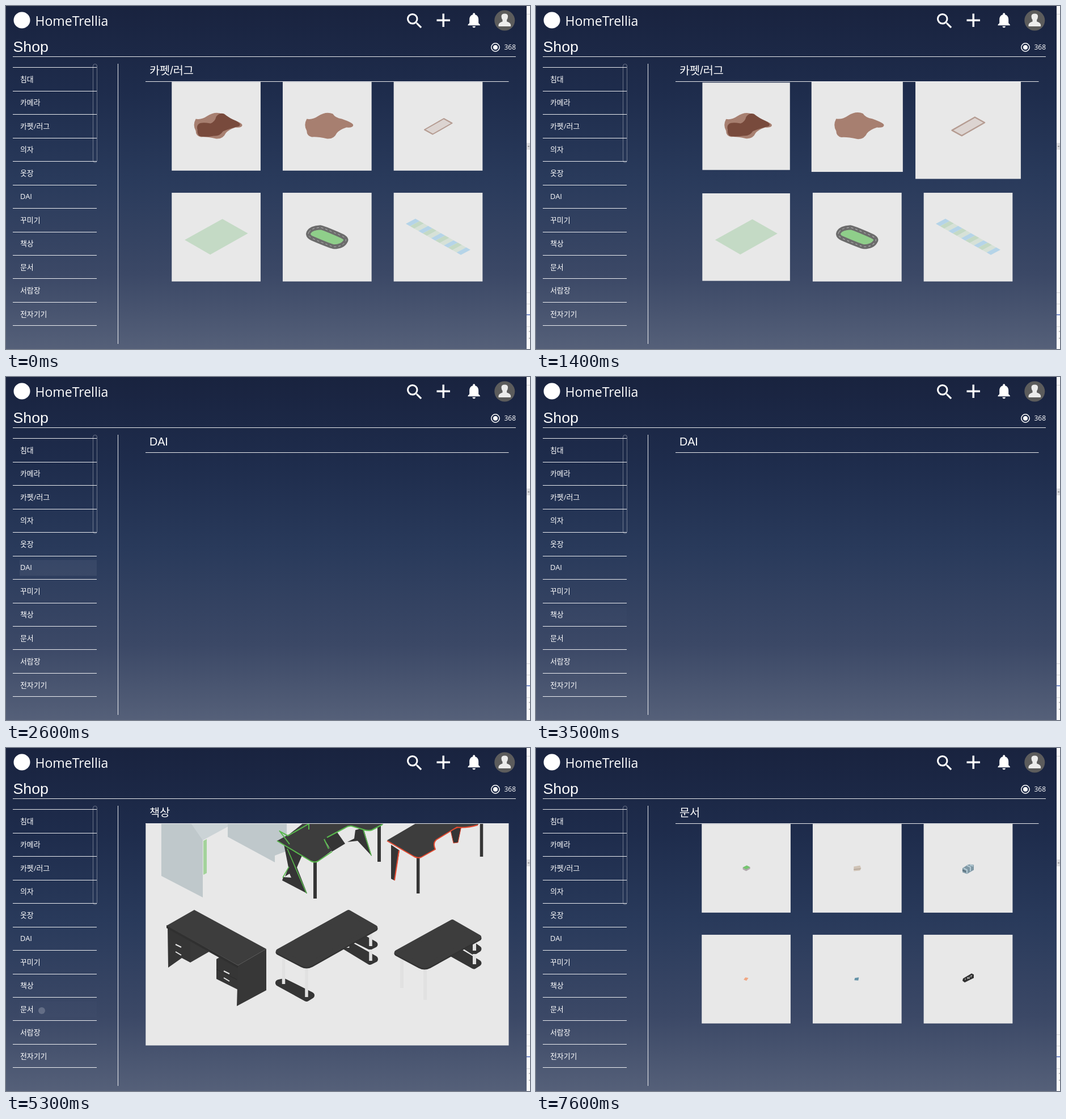
Animation, 924 px wide and 606 px high, one loop 7.7 s. Source, as an HTML page:

```html
<!DOCTYPE html>
<html lang="ko">
<head>
<meta charset="utf-8">
<title>Shop</title>
<style>
  html, body { margin: 0; width: 100%; height: 100%; overflow: hidden; background: #19233f; }
  svg { display: block; width: 924px; height: 606px; }
  text { fill: #fff; font-family: "Open Sans", "Noto Sans CJK KR", "Noto Sans CJK", sans-serif; }
  .head { font-family: "Liberation Sans", "Noto Sans CJK KR", "Noto Sans CJK", sans-serif; }
</style>
</head>
<body>
<svg id="stage" viewBox="0 0 924 606" xmlns="http://www.w3.org/2000/svg">
  <defs>
    <linearGradient id="night" x2="0" y2="1">
      <stop offset="0" stop-color="#19233f"/>
      <stop offset=".25" stop-color="#1e2c4c"/>
      <stop offset=".5" stop-color="#293a5b"/>
      <stop offset=".78" stop-color="#3b4866"/>
      <stop offset="1" stop-color="#556079"/>
    </linearGradient>
    <clipPath id="shelf"><rect x="246.300" y="134" width="640.200" height="391.400"/></clipPath>
    <clipPath id="rowClip"><rect id="rowClipBox" x="24" width="136" height="28"/></clipPath>
  </defs>
  <rect width="924" height="606" fill="url(#night)"/>
  <g id="strip">
    <rect x="918" width="6" height="606" fill="#fafafa"/>
    <path d="M918 14.500h6M918 506.500h6M918 526.500h6M918 566.500h6" stroke="#d5d5d8"/>
    <path d="M918 545.500h6" stroke="#4a64b8" stroke-width="1.500"/>
    <path d="M922 575h2M922 587h2" stroke="#888"/>
    <g id="thumb"><rect x="918" y="-6" width="6" height="12" fill="#dcdcdf"/><path d="M920 0h3" stroke="#666"/></g>
  </g>
  <circle cx="28" cy="25" r="14.500" fill="#fff"/>
  <text x="51.500" y="35" font-size="23">HomeTrellia</text>
  <g fill="#fff">
    <path transform="translate(702.500 8.500) scale(1.500)" d="M15.500 14h-.790l-.280-.270A6.470 6.470 0 0 0 16 9.500 6.500 6.500 0 1 0 9.500 16c1.610 0 3.090-.590 4.230-1.570l.270.280v.790l5 4.990L20.490 19zM9.500 14a4.500 4.500 0 1 1 0-9 4.500 4.500 0 0 1 0 9z"/>
    <path d="M759.500 23.500h10v-10h3.500v10h10v3.500h-10v10h-3.500v-10h-10z"/>
    <path transform="translate(809.200 9) scale(1.333)" d="M12 22c1.100 0 2-.900 2-2h-4c0 1.100.900 2 2 2zm6-6v-5c0-3.070-1.640-5.640-4.500-6.320V4c0-.830-.670-1.500-1.500-1.500s-1.500.670-1.500 1.500v.680C7.630 5.360 6 7.920 6 11v5l-2 2v1h16v-1z"/>
  </g>
  <circle cx="879.300" cy="25.500" r="18" fill="#5c5c5c"/>
  <path d="M868.500 36v-3q1-4 7-5.500v-3q-2-3-2-6 0-5 5.800-5t5.800 5q0 3-2 6v3q6 1.500 7 5.500v3z" fill="#ececec"/>
  <text class="head" x="12.500" y="81" font-size="26.700">Shop</text>
  <circle cx="863" cy="73" r="7.200" fill="none" stroke="#fff" stroke-width="1.500"/>
  <circle cx="863" cy="73" r="4" fill="#fff"/>
  <text x="878.500" y="77.300" font-size="12">368</text>
  <rect id="hover" x="24" width="136" height="28" fill="#fff"/>
  <g clip-path="url(#rowClip)"><circle id="ripple" cx="63" fill="#fff"/></g>
  <g id="menu"></g>
  <g fill="none" stroke="#fff">
    <path stroke-opacity=".9" d="M12 89.500H899M246 133.500H886.500M197.500 102V597"/>
    <rect x="153.500" y="102.500" width="7" height="174" rx="3.500" stroke-opacity=".35"/>
  </g>
  <text id="title" class="head" x="253" y="121" font-size="19.700"></text>
  <g id="pages" clip-path="url(#shelf)"></g>
</svg>
<script>
const LOOP = 7700, STEP = 100, SIZE = 156.7;
const LIGHT = "#e8e8e8", SHADE = "#dedede", DARK = "#3d3d3d", SIDE = "#353535";
const byId = id => document.getElementById(id);

function add(parent, tag, attrs) {
  const node = document.createElementNS("http://www.w3.org/2000/svg", tag);
  for (const key in attrs) node.setAttribute(key, attrs[key]);
  return parent.appendChild(node);
}
const shape = (d, fill, stroke = "none", width = 1, extra = "") =>
  `<path d="${d}" fill="${fill}" stroke="${stroke}" stroke-width="${width}" stroke-linejoin="round" ${extra}/>`;
const line = (d, stroke, width, cap = "butt") =>
  shape(d, "none", stroke, width, `stroke-linecap="${cap}"`);

// Sidebar
const items = ["침대", "카메라", "카펫/러그", "의자", "옷장", "DAI", "꾸미기", "책상", "문서", "서랍장", "전자기기"];
const rowY = i => 129.5 + i * 41.45;
const menu = byId("menu");
for (let i = 0; i <= items.length; i++) {
  const y = Math.floor(rowY(i) - 20.6) + .5;
  add(menu, "path", { d: `M12 ${y}H160`, stroke: "#fff", "stroke-opacity": .9 });
  if (i < items.length)
    add(menu, "text", { x: 25, y: rowY(i) + 4.5, "font-size": 12.9 }).textContent = items[i];
}

// Item drawings: rugs and papers are centred on 0,0; desks use stage coordinates
const hide = shape("M-36-13Q-26-11-16-18Q-2-27 10-22Q14-15 26-13Q46-6 46-2Q46 3 34 2Q22 6 17 12Q12 23 0 22Q-18 18-27 19Q-36 17-36 8Q-42-2-36-13Z", "#a77f70");
function stripes() {
  const colors = ["#b5d4e8", "#c4d9c5", "#d6e1d7"], n = 13;
  let out = "";
  for (let i = 0; i < n; i++) {
    const x = -57 + 97 * i / n, y = -23.5 + 55 * i / n;
    out += shape(`M${x} ${y}l17-9l${97 / n} ${55 / n}l-17 9z`, colors[i % 3]);
  }
  return out;
}
const track = "M-32-9Q-28-16-12-17Q-8-17 26-2Q36 3 32 8Q27 17 12 17Q8 17-27 2Q-36-3-32-9Z";
const rugs = [
  hide + shape("M-31-4Q-26-8-10-5Q-2-8 0-17Q6-25 14-22Q24-14 34-10Q46-4 40 0Q20 5 12 9Q6 18-4 17Q-22 20-30 17Q-34 12-33 6Q-35 0-31-4Z", "#784a3c"),
  hide,
  shape("M-24 6L10-13.500L24.500-5.500L-9.500 14Z", "#dcd4d1", "#b59c92", 2),
  shape("M-55.500 5L11-32L56-6.500L-10.500 31Z", "#c4dac5"),
  shape(track, "#8fce8a", "#6c6c6c", 8) + shape(track, "none", "#b5b5b5", 1, 'stroke-dasharray="4 4"'),
  stripes()
];

const green = "#58b94c", red = "#e5492f", steel = "#bfc8cb", pale = "#e1e1e1";
const foot = (d, width) => shape(d, SIDE, SIDE, width);
const desks = [
  shape("M274 110H330L347 163V264L274 226Z", steel) + shape("M310 110L347 163L393 138V110Z", "#cbd3d6") +
    shape("M391 110V157L474 202V190L495 182V110Z", steel) + shape("M348 164L354 161V221L348 224Z", "#a3d39b"),
  shape("M490 170L522 190L513 211L531 257L487 234L489 228L503 229L500 222L492 227L498 211Z", SIDE) +
    line("M496 178L530 257M488 229L499 210", green, 1.6) +
    shape("M561 161L582 146L598 169L575 183Z", SIDE) +
    shape("M602 166L614 160L616 145L630 141L645 191L620 164Z", SIDE) + line("M630 145L644 190", green, 1.6) +
    line("M545 201V266M658 136V201", SIDE, 6) +
    shape("M478 164L500 152L534 125H680L664 135L645 145Q638 147 630 144L610 138Q604 137 598 141L566 158Q558 164 575 181L550 200Q544 203 538 200Z", DARK) +
    line("M478 164L538 200Q544 203 550 200L575 183M561 161L569 178M566 158L598 141Q604 137 610 138L630 144Q638 147 645 145L664 135", green, 2) +
    line("M500 170L482 146M484 148L497 155L534 134V144", green, 2),
  shape("M679 171L694 181L685 234L679 231Z", SIDE) + line("M693 181L685 234", red, 2) +
    shape("M784 146L803 138L797 167L789 168Z", SIDE, red, 1) + line("M726.700 192V257M838.500 130V192", SIDE, 5.500) +
    shape("M672 163L735 126H840L832 136Q812 142 795 140L759 162Q752 168 757 179L732 193Q726 195 720 192Z", DARK) +
    line("M672 164L720 192Q726 195 732 193L757 179Q752 168 759 162L795 140Q812 142 832 136", red, 2),
  shape("M285 317L325 340V379L310 371L286 388Z", SIDE) + shape("M325 338L358 360L325 379Z", "#393939") +
    shape("M371 373L378 369L409 387V427L371 408Z", "#363636") + shape("M283 313L409 384V389L283 318Z", "#303030") +
    shape("M409 384L459 355V428L407 456Z", "#373737") + shape("M283 314L332 286L459 355L409 384Z", DARK) +
    line("M299 347L309 352M299 360L309 366M384 394L394 399M384 406L394 412", "#e5e5e5", 2) + line("M371 391L407 409", "#2c2c2c", 1),
  foot("M481 415L490 413L538 437L530 442Z", 12) + foot("M596 349L604 347L650 373L642 377Z", 12) +
    foot("M606 333L618 329L650 347L642 351Z", 11) +
    line("M489.500 372V417M530 388V440M602.500 340V353M643 320V350M643 356V376", pale, 5.500) +
    shape("M480 361L604 291L651 319L538 383Q530 387 522 383Z", "#323232", "#323232", 9) +
    shape("M480 359L604 290L651 317L538 381Q530 385 522 381Z", DARK, DARK, 8),
  foot("M784 362L796 358L833 380L825 385Z", 11) + foot("M800 344L812 340L833 355L825 360Z", 11) +
    line("M698 370V424M739 388V445M826 340V358M826 364V382", pale, 6) +
    shape("M689 363L787 308L834 336L746 385Q738 389 730 385Z", "#323232", "#323232", 9) +
    shape("M689 361L787 307L834 334L746 383Q738 387 730 383Z", DARK, DARK, 8)
];

const papers = [
  shape("M-6-1.500L1-5L7-2V1L0 5L-6 2Z", "#b0a8ac") + shape("M-6-1.500L1-5L7-2L0 2Z", "#74c76f"),
  shape("M-6-3L5-5L7 0L5 4L-6 5Z", "#cfc3b6") + line("M-6 2L6 1", "#a5978b", 1.200),
  shape("M-10 0L-1-6L3-7L10-6V3L-2 10L-10 7Z", "#7f98a5") + line("M-8 0L-2 3V9M-2-5L4-2V5M3-6L9-4", "#b5cbd5", 2) + line("M-10 3L-4 6", "#526874", 1.500),
  shape("M-4.500 1L-1.500-3L4-2L.500 3Z", "#f0a783"),
  shape("M-4-2L3-3L2 2.500L-5 2Z", "#6593a8"),
  shape("M-9-1L6-10L10-8V-2L-6 6L-10 3Z", "#303030") + line("M-5 1.500V-1M-1 0V-3L2-1V-4.500M5-3V-6H7", "#ddd", 1)
];

// Pages of six cards, visible between two times
const centre = i => [370.6 + (i % 3) * 195.7, i < 3 ? 212.5 : 408.3];
function makePage(art, from, to, boxed) {
  const group = add(byId("pages"), "g", {});
  let dim;
  if (!boxed) {
    add(group, "rect", { x: 246, y: 134, width: 641, height: 392, fill: LIGHT });
    dim = add(group, "rect", { x: 246, y: 134, width: 281, height: 392, fill: SHADE });
  }
  const cards = art.map((drawing, i) => {
    const [cx, cy] = centre(i), card = add(group, "g", {});
    if (boxed) {
      add(card, "rect", { x: cx - SIZE / 2, y: cy - SIZE / 2, width: SIZE, height: SIZE, fill: LIGHT });
      add(card, "g", { transform: `translate(${cx} ${cy})` }).innerHTML = drawing;
    } else card.innerHTML = drawing;
    return card;
  });
  return { group, cards, from, to, dim };
}
const pages = [
  makePage(rugs, 0, 2500, true),
  makePage(desks, 3800, 5500, false),
  makePage(papers, 5700, LOOP, true)
];

// Pointer visits per page: [card, enter, leave, strength]
const visits = [
  [[0, 40, 240], [1, 240, 400], [2, 400, 600], [5, 600, 790], [4, 790, 1000], [3, 1000, 1200],
   [0, 1090, 1235], [1, 1150, 1298], [2, 1290, 1560]],
  [[0, 4255, 4330], [3, 4253, 4430], [4, 4285, 4330], [4, 4430, 4540], [5, 4540, 4700],
   [2, 4700, 4760], [1, 4760, 4830], [0, 4830, 4900]],
  [[3, 5830, 5980], [0, 5960, 6130], [1, 6030, 6180], [2, 6060, 6190], [3, 6270, 6340, -.5],
   [4, 6207, 6430], [5, 6430, 6620], [2, 6620, 6760], [1, 6760, 6900], [4, 6900, 7040],
   [5, 7040, 7150], [2, 7150, 7270]]
];

// Step response of an underdamped spring: stiffness 550, damping 30
function spring(ms) {
  if (ms <= 0) return 0;
  const t = ms / 1000, w = Math.sqrt(325);
  return 1 - Math.exp(-15 * t) * (Math.cos(w * t) + 15 / w * Math.sin(w * t));
}
const scaleAt = (list, card, t) => list.reduce((s, [c, enter, leave, power = 1]) =>
  c === card ? s + .2 * power * (spring(t - enter) - spring(t - leave)) : s, 1);

const titles = [[0, "카펫/러그"], [2400, "DAI"], [3600, "책상"], [5400, "문서"]];
const hovers = [[2, 1800, 1950], [3, 1950, 2050], [4, 2050, 2150], [5, 2150, 3400], [6, 3350, 3500],
                [7, 3450, 3900], [7, 4950, 5200], [8, 5250, 5600]];
const clicks = [[5, 2300], [7, 3550], [8, 5250]];
const latest = (list, t, at) => list.filter(entry => entry[at] <= t).pop();
const show = (node, on) => node.setAttribute("display", on ? "inline" : "none");

function draw(t) {
  byId("title").textContent = latest(titles, t, 0)[1];
  byId("thumb").setAttribute("transform", `translate(0 ${t < 2400 ? 248 : 203})`);

  const over = hovers.find(h => t >= h[1] && t < h[2]);
  show(byId("hover"), over);
  if (over) {
    byId("hover").setAttribute("y", rowY(over[0]) - 13.5);
    byId("hover").setAttribute("fill-opacity", .06 * Math.min(1, (t - over[1]) / 250));
  }

  const click = latest(clicks, t, 1), age = click ? t - click[1] : LOOP;
  show(byId("ripple"), age < 300);
  if (age < 300) {
    const y = rowY(click[0]);
    byId("rowClipBox").setAttribute("y", y - 13.5);
    byId("ripple").setAttribute("cy", y + 3);
    byId("ripple").setAttribute("r", 6 * Math.pow(age / 50, 1.6));
    byId("ripple").setAttribute("opacity", .2 * Math.min(1, (300 - age) / 200));
  }

  pages.forEach((page, p) => {
    const on = t >= page.from && t < page.to;
    show(page.group, on);
    if (!on) return;
    page.cards.forEach((card, i) => {
      const [cx, cy] = centre(i), s = scaleAt(visits[p], i, t);
      card.setAttribute("transform", `translate(${cx} ${cy}) scale(${s}) translate(${-cx} ${-cy})`);
    });
    if (page.dim) show(page.dim, t >= 4300 && t < 4500);
  });
  pages[2].cards[2].firstChild.setAttribute("fill", t >= 6200 && t < 6400 ? SHADE : LIGHT);
}

const start = performance.now();
function tick() {
  const t = (performance.now() - start) % LOOP;
  draw(Math.floor(t / STEP) * STEP);
  requestAnimationFrame(tick);
}
tick();
</script>
</body>
</html>
```
